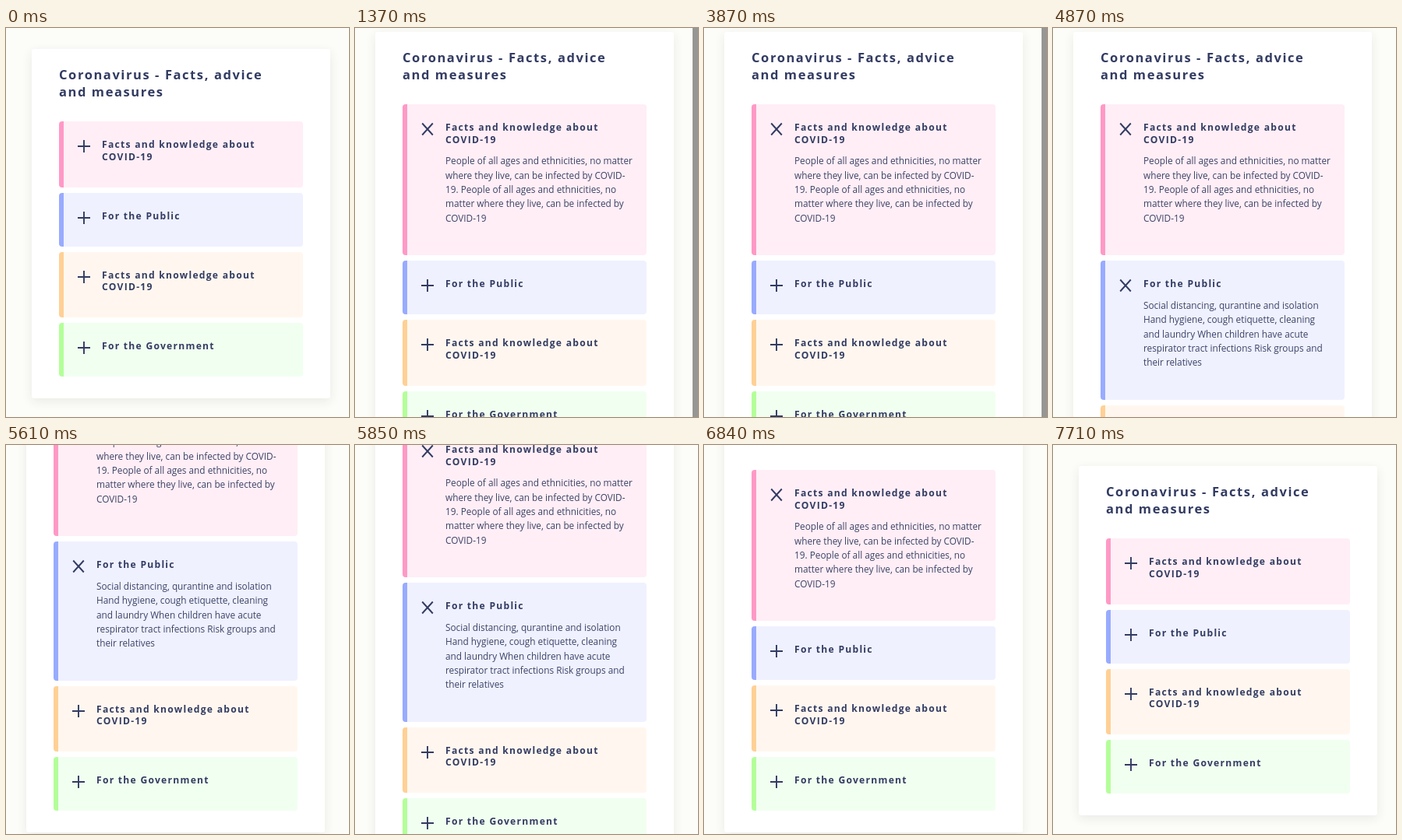
An HTML page for the animation above (8.83 s loop, 440 by 500 pixels).

```html
<!DOCTYPE html>
<html lang="en">
<head>
<meta charset="utf-8">
<title>Facts accordion</title>
<style>
html, body { margin: 0; width: 100%; height: 100%; overflow: hidden; background: #fcfdf8; }
* { box-sizing: border-box; }

.stage {
  --a: 0; --b: 0; --bar: 0;
  position: relative; width: 440px; height: 500px; overflow: hidden;
  background: #fcfdf8; color: #323b62;
  font-family: "Open Sans", "Noto Sans", sans-serif;
  animation: first 8830ms step-end infinite, second 8830ms step-end infinite, bar 8830ms step-end infinite;
}
.card {
  position: absolute; left: 0; top: 0; width: 383px; padding: 93px 35px 28px;
  background: #fff; border-radius: 3px;
  box-shadow: 0 4px 14px rgba(40, 45, 40, .09);
  animation: place 8830ms step-end infinite;
}
h1, h2, p { margin: 0; white-space: nowrap; }
h1 {
  position: absolute; left: 35px; top: 21.6px;
  font-size: 16.5px; line-height: 22px; letter-spacing: 1.58px; font-weight: 700;
}
.item {
  --open: 0;
  position: relative; overflow: hidden; width: 312.5px;
  height: calc(var(--h) + var(--open) * 109.5px);
  padding: 22.2px 0 0 55px; margin-bottom: 7px; border-radius: 4px;
  background: linear-gradient(90deg, var(--edge) 5.5px, var(--fill) 5.5px);
}
.item:last-child { margin-bottom: 0; }
.tall { --h: 84.5px; }
.low { --h: 69px; }
.pink { --edge: #ff99c6; --fill: #ffeef6; --open: var(--a); }
.blue { --edge: #98abff; --fill: #eff1ff; --open: var(--b); }
.orange { --edge: #ffd095; --fill: #fff7ef; }
.green { --edge: #b3ff99; --fill: #f1fff0; }
h2 { font-size: 12.1px; line-height: 15.4px; letter-spacing: 1.27px; font-weight: 700; }
p {
  margin-top: 10.4px; font-size: 11.8px; line-height: 18.35px; color: #3c4366;
  opacity: var(--open);
}
svg {
  position: absolute; left: 21.7px; top: 22.3px; width: 20px; height: 20px;
  fill: none; stroke: #323b62; stroke-width: 1.9;
}
.plus { opacity: calc(1 - var(--open)); }
.cross { opacity: var(--open); }
.scroll {
  position: absolute; right: 0; top: 0; width: 7px; height: 500px;
  background: #969694; opacity: var(--bar);
}

/* open panels */
@keyframes first {
  0% { --a: 0; } 15.515% { --a: 1; } 32.503% { --a: 0; }
  43.828% { --a: 1; } 87.316%, 100% { --a: 0; }
}
@keyframes second {
  0% { --b: 0; } 55.153% { --b: 1; } 77.463%, 100% { --b: 0; }
}
@keyframes bar {
  0% { --bar: 0; } 15.515% { --bar: 1; } 32.503% { --bar: 0; }
  43.828% { --bar: 1; } 55.153%, 100% { --bar: 0; }
}
/* centred, or shifted and scrolled */
@keyframes place {
  0% { transform: translate(33px, 27px); }
  15.515% { transform: translate(26px, 5px); }
  32.503% { transform: translate(33px, 27px); }
  43.828% { transform: translate(26px, 5px); }
  62.174% { transform: translate(26px, -99px); }
  63.533% { transform: translate(26px, -170px); }
  64.892% { transform: translate(26px, -157px); }
  66.251% { transform: translate(26px, -117px); }
  67.610% { transform: translate(26px, -99px); }
  77.463% { transform: translate(26px, -61px); }
  87.316%, 100% { transform: translate(33px, 27px); }
}
</style>
</head>
<body>
<div class="stage">
  <div class="card">
    <h1>Coronavirus - Facts, advice<br>and measures</h1>
    <div class="item tall pink">
      <svg viewBox="-10 -10 20 20"><path class="plus" d="M-8 0H8M0-8V8"/><path class="cross" d="M-6.8-7.5L6.8 7.5M6.8-7.5L-6.8 7.5"/></svg>
      <h2>Facts and knowledge about<br>COVID-19</h2>
      <p>People of all ages and ethnicities, no matter<br>where they live, can be infected by COVID-<br>19. People of all ages and ethnicities, no<br>matter where they live, can be infected by<br>COVID-19</p>
    </div>
    <div class="item low blue">
      <svg viewBox="-10 -10 20 20"><path class="plus" d="M-8 0H8M0-8V8"/><path class="cross" d="M-6.8-7.5L6.8 7.5M6.8-7.5L-6.8 7.5"/></svg>
      <h2>For the Public</h2>
      <p>Social distancing, qurantine and isolation<br>Hand hygiene, cough etiquette, cleaning<br>and laundry When children have acute<br>respirator tract infections Risk groups and<br>their relatives</p>
    </div>
    <div class="item tall orange">
      <svg viewBox="-10 -10 20 20"><path d="M-8 0H8M0-8V8"/></svg>
      <h2>Facts and knowledge about<br>COVID-19</h2>
    </div>
    <div class="item low green">
      <svg viewBox="-10 -10 20 20"><path d="M-8 0H8M0-8V8"/></svg>
      <h2>For the Government</h2>
    </div>
  </div>
  <div class="scroll"></div>
</div>
</body>
</html>
```
